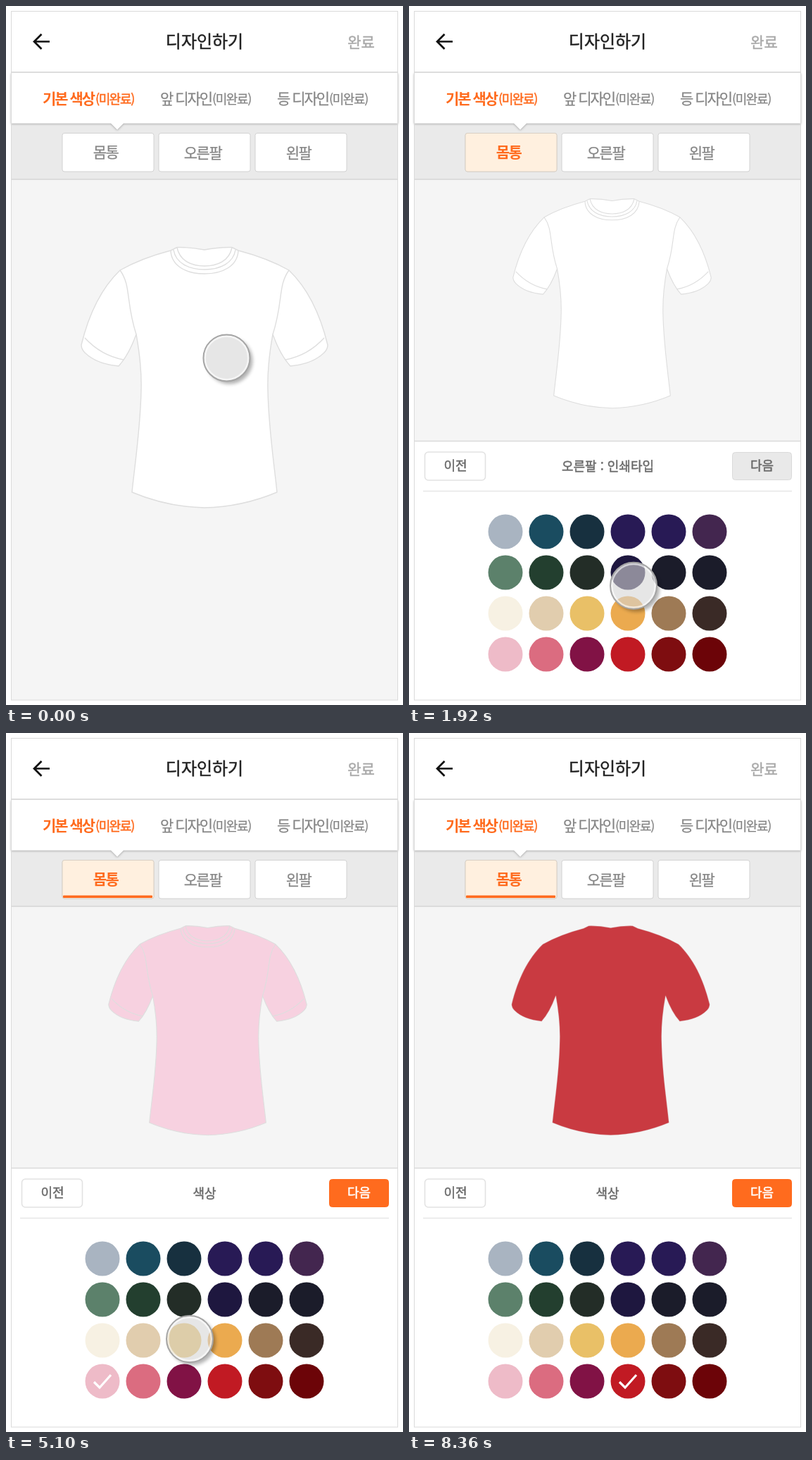
Animation, 564 px wide and 992 px high, one loop 8580 ms. Source, as an HTML page:

```html
<!DOCTYPE html>
<html lang="ko">
<head>
<meta charset="utf-8">
<style>
html, body { margin: 0; height: 100%; overflow: hidden; background: #fff; }
svg { display: block; width: 100vw; height: 100vh; }
text { font-family: "Noto Sans CJK KR", "Noto Sans CJK JP", "Noto Sans CJK", sans-serif; text-anchor: middle; fill: currentColor; }
.tab { font-size: 21px; letter-spacing: -2px; color: #858585; }
.tab text { text-anchor: start; }
.note { font-size: 18px; letter-spacing: -1.4px; }
.part { font-size: 21px; letter-spacing: -1.5px; color: #858585; }
.label { font-size: 18px; color: #6a6a6a; }
.on { color: #ff6b1e; }
.bold { font-weight: 700; }
/* a thin outline gives the medium weight */
.medium { stroke: currentColor; stroke-width: .5px; }
.light { stroke: currentColor; stroke-width: .25px; }
.line { fill: none; stroke: #dedede; stroke-width: 1.4; }
</style>
</head>
<body>
<svg viewBox="0 0 564 992">
  <defs>
    <clipPath id="screen"><rect x="7" y="7" width="550" height="978"/></clipPath>
    <mask id="outside" maskUnits="userSpaceOnUse" x="-60" y="-60" width="120" height="120">
      <rect x="-60" y="-60" width="120" height="120" fill="#fff"/><circle r="33"/>
    </mask>
  </defs>

  <rect x="7" y="167" width="550" height="818" fill="#f5f5f5"/>
  <rect x="7" y="167" width="550" height="79" fill="#eaeaea"/>
  <path d="M7 246H557" stroke="#d6d6d6" stroke-width="1.5"/>

  <g style="filter:drop-shadow(0 1px 1.5px rgba(0,0,0,.28))">
    <path d="M7 95H557V166.500H167L158 175.500L149 166.500H7Z" fill="#fff"/>
  </g>
  <path d="M7 94H557" stroke="#d4d4d4" stroke-width="1.5"/>
  <path d="M62 50.500H40M50.500 40L40 50.500L50.500 61" fill="none" stroke="#111" stroke-width="2.700"/>
  <text class="medium" x="282" y="59" font-size="24" color="#222">디자인하기</text>
  <text class="medium" x="504.500" y="58.500" font-size="21" color="#a9a9a9">완료</text>

  <g class="tab">
    <text class="on" x="52" y="138.500"><tspan class="bold">기본 색상</tspan><tspan class="note medium" x="127">(미완료)</tspan></text>
    <text class="light" x="219" y="138.500">앞 디자인<tspan class="note" x="293">(미완료)</tspan></text>
    <text class="light" x="385" y="138.500">등 디자인<tspan class="note" x="459">(미완료)</tspan></text>
  </g>

  <g fill="#fff" stroke="#d2d2d2">
    <rect x="80" y="180.500" width="130" height="54.500" rx="3"/>
    <rect x="217" y="180.500" width="130" height="54.500" rx="3"/>
    <rect x="354" y="180.500" width="130" height="54.500" rx="3"/>
  </g>
  <text class="part light" id="idle" x="141.500" y="215">몸통</text>
  <text class="part light" x="279.500" y="215.500">오른팔</text>
  <text class="part light" x="415.500" y="215.500">왼팔</text>
  <g id="active">
    <rect x="80" y="180.500" width="130" height="54.500" rx="3" fill="#fff0df" stroke="#d8cfc4"/>
    <text class="part on bold" x="141.500" y="215">몸통</text>
  </g>
  <rect id="bar" y="230.500" height="3.500" rx="1" fill="#ff6b1e"/>

  <g id="shirt">
    <path id="cloth" class="line" stroke-linejoin="round" d="M234 347L243 342.500Q262 342 282 346Q302 342 321 342.500L330 347Q372 358 402 375
      C428 400 446 436 457 481Q457 487 452 492Q436 508 404 511Q390 496 379 466Q371 510 372 545C373 600 381 650 385 690
      Q335 711 282 712Q229 711 179 690C183 650 191 600 192 545Q193 510 185 466Q174 496 160 511Q128 508 112 492
      Q107 487 107 481C118 436 136 400 162 375Q192 358 234 347Z"/>
    <g id="seams" class="line">
      <path d="M234 347C235 369 256 380 282 380S329 369 330 347"/>
      <path d="M238 346C241 365 260 374 282 374S323 365 326 346"/>
      <path d="M243 343C247 362 264 369 282 369S317 362 321 343"/>
      <path d="M402 375C386 397 394 420 379 466M452 471Q429 496 397 502"/>
      <path d="M162 375C178 397 170 420 185 466M112 471Q135 496 167 502"/>
    </g>
  </g>

  <g clip-path="url(#screen)">
    <g id="panel">
      <rect x="8" y="617" width="548" height="420" fill="#fff"/>
      <path d="M8 617.500H556" stroke="#d9d9d9" stroke-width="1.500"/>
      <rect x="22.500" y="633" width="86" height="40" rx="5" fill="#fff" stroke="#e2e2e2" stroke-width="1.600"/>
      <text class="label medium" x="66" y="658.500">이전</text>
      <rect id="next" x="459.500" y="633.500" width="84" height="39" rx="4"/>
      <text class="label medium" id="nextText" x="501.500" y="659">다음</text>
      <text class="label medium" id="oldTitle" x="282.500" y="660">오른팔 : 인쇄타입</text>
      <text class="label medium" id="newTitle" x="282" y="660">색상</text>
      <path d="M20 688.500H544" stroke="#e6e6e6" stroke-width="1.300"/>
      <g id="dots"></g>
      <g fill="none" stroke="#fff" stroke-width="3.200">
        <path id="check0" transform="translate(137 920)" d="M-12 1L-4 9L12 -9"/>
        <path id="check1" transform="translate(253 862)" d="M-12 1L-4 9L12 -9"/>
        <path id="check2" transform="translate(311 920)" d="M-12 1L-4 9L12 -9"/>
      </g>
    </g>
  </g>
  <rect x="7.500" y="7.500" width="549" height="977.500" fill="none" stroke="#dadada"/>

  <g id="cursor">
    <g mask="url(#outside)"><circle cx="4" cy="4" r="33" fill="#000" opacity=".3" style="filter:blur(2.5px)"/></g>
    <circle r="33" fill="#d5d5d5" fill-opacity=".6"/>
    <circle r="30.800" fill="none" stroke="#fff" stroke-opacity=".6" stroke-width="2.600"/>
    <circle r="33" fill="none" stroke="#a5a5a5" stroke-width="2"/>
  </g>
</svg>
<script>
const LOOP = 8580;
const swatches = `a9b4c1 1a4c60 17303f 281a55 281a55 43264f
  5c816b 233f2f 232d27 1e173f 1b1c2a 1b1c2a
  f7f1e3 e1cdae e9c067 ebaa4f 9e7a55 3a2a26
  eebbc8 db6c80 811245 c11a23 7e0d10 6c0408`.split(/\s+/);
const white = [255, 255, 255], pink = [247, 209, 224], yellow = [240, 207, 160], red = [201, 58, 65];
// start, end, destination, control point, ease-out power
const moves = [
  [0, 60, 310, 496, 312, 498, 1],
  [1600, 2380, 124, 908, 448, 895, 1.56],
  [2540, 2660, 133, 915, 128, 911, 1],
  [3940, 4780, 261, 860, 258, 915, 1],
  [6140, 6560, 310, 918, 285, 889, 1.6]
];

const $ = id => document.getElementById(id);
const set = (id, attrs) => { for (const k in attrs) $(id).setAttribute(k, attrs[k]); };
const lerp = (a, b, p) => a + (b - a) * p;
const mix = (a, b, p) => a.map((v, i) => lerp(v, b[i], p));
const rgb = c => `rgb(${c.map(Math.round)})`;
const inOut = p => p < .5 ? 2 * p * p : 1 - 2 * (1 - p) ** 2;
const bezier = (a, c, b, u) => lerp(lerp(a, c, u), lerp(c, b, u), u);

$('dots').innerHTML = swatches.map((c, i) =>
  `<circle cx="${137 + i % 6 * 58}" cy="${746 + Math.floor(i / 6) * 58}" r="24.500" fill="#${c}"/>`).join('');

function draw(t) {
  const span = (a, b) => Math.min(1, Math.max(0, (t - a) / (b - a)));
  const open = inOut(span(420, 760)), hidden = 1 - open;
  const first = span(3120, 3560), second = span(5260, 5660), third = span(7040, 7420);

  const tabOn = span(420, 640);
  set('active', { opacity: tabOn });
  set('idle', { opacity: 1 - tabOn });
  set('bar', { x: lerp(76, 81, first), width: 127 * first, opacity: Math.min(1, first * 1.5) });

  set('shirt', { transform: `translate(${lerp(282, 288.5, open) - 2 * first} ${lerp(527, 422, open)})
    scale(${lerp(1, .804, open)}) translate(-282 -527)` });
  let cloth = mix(white, pink, first ** 2);
  cloth = mix(cloth, yellow, second ** 1.5);
  cloth = mix(cloth, red, third ** 1.5);
  set('cloth', { style: `fill:${rgb(cloth)};stroke-opacity:${1 - .7 * second}` });
  set('seams', { opacity: 1 - second });

  set('panel', {
    opacity: open ** .75,
    transform: `translate(282 ${617 + 208 * hidden}) scale(${1 - .06 * hidden} ${1 - .21 * hidden}) translate(-282 -617)`
  });
  set('next', {
    fill: rgb(mix([233, 233, 233], [255, 107, 30], first)),
    stroke: rgb(mix([218, 218, 218], [255, 107, 30], first))
  });
  set('nextText', { style: `color:${rgb(mix([106, 106, 106], white, first))}` });
  set('oldTitle', { opacity: 1 - first });
  set('newTitle', { opacity: first });
  set('check0', { opacity: first * (1 - second) });
  set('check1', { opacity: second * (1 - third) });
  set('check2', { opacity: third });

  let x = 313.5, y = 499.5;
  for (const [start, end, toX, toY, midX, midY, power] of moves) {
    const u = 1 - (1 - span(start, end)) ** power;
    x = bezier(x, midX, toX, u);
    y = bezier(y, midY, toY, u);
    if (u < 1) break;
  }
  const leave = span(8140, 8360);
  set('cursor', {
    opacity: 1 - (t < 5100 ? span(4360, 4780) : leave),
    transform: `translate(${x} ${y + 25 * leave}) scale(${1 + .3 * leave})`
  });
}

const begin = performance.now();
function tick() {
  draw((performance.now() - begin) % LOOP);
  requestAnimationFrame(tick);
}
tick();
</script>
</body>
</html>
```
